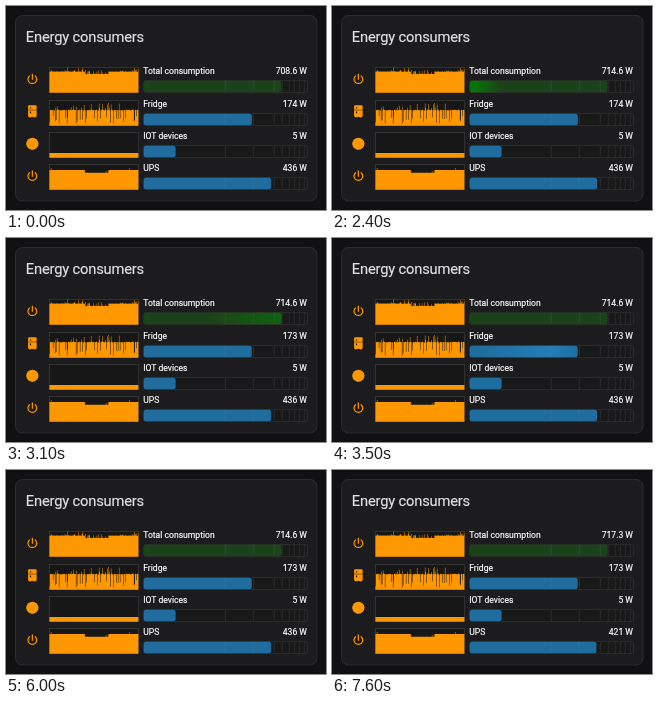
An HTML page for the animation above (9 s loop, 320x204 px).

```html
<!DOCTYPE html>
<html lang="en">
<head>
<meta charset="utf-8">
<title>Energy consumers</title>
<style>
html, body { margin: 0; width: 100%; height: 100%; overflow: hidden; background: #111012; }
svg { display: block; width: 100vw; height: 100vh; }
text { font: 8.6px Roboto, Arial, sans-serif; fill: #fff; stroke: #fff; stroke-width: 0.18px; }
.title { font-size: 14.7px; letter-spacing: -0.012em; fill: #e1e1e1; stroke: #e1e1e1; }
.value { text-anchor: end; }
.orange { fill: #ff9800; }
</style>
</head>
<body>
<svg id="stage" viewBox="0 0 320 204"></svg>
<script>
const LOOP = 9000, LEFT = 137, WIDTH = 165, MAX_WATTS = 2500;
const stage = document.getElementById('stage');

function add(tag, attrs, parent = stage, text = '') {
  const node = document.createElementNS('http://www.w3.org/2000/svg', tag);
  for (const key in attrs) node.setAttribute(key, attrs[key]);
  node.textContent = text;
  parent.appendChild(node);
  return node;
}

function seeded(seed) {
  return () => (seed = (seed * 16807) % 2147483647) / 2147483647;
}

const POWER = 'M16.56 5.44L15.11 6.89C16.84 7.94 18 9.83 18 12A6 6 0 0 1 6 12C6 9.83 7.16 7.94 8.88 6.88L7.44 5.44C5.36 6.88 4 9.28 4 12A8 8 0 0 0 20 12C20 9.28 18.64 6.88 16.56 5.44M13 3H11V13H13';
const FRIDGE = 'M7 2H17A2 2 0 0 1 19 4V9H5V4A2 2 0 0 1 7 2M19 19A2 2 0 0 1 17 21V22H15V21H9V22H7V21A2 2 0 0 1 5 19V10H19V19M8 5V7H10V5H8M8 12V15H10V12H8Z';
const DOT = 'M2 12A10 10 0 0 1 22 12A10 10 0 0 1 2 12Z';

// Column heights, measured up from the chart's floor
const dip = x => x > 35 && x < 59;
const charts = {
  total: (x, rnd) => (dip(x) ? 18.6 : 21) + rnd() * 0.5 + (rnd() < 0.14 ? 1 + rnd() * 3 : 0),
  fridge: (x, rnd) => {
    const pick = rnd();
    if (pick < 0.13) return 2 + rnd() * 8;
    return pick > 0.9 ? 17 + rnd() * 6 : 15.2 + rnd();
  },
  iot: () => 4.8,
  ups: (x, rnd) => (dip(x) ? 17 : 19.8) + (rnd() < 0.02 ? 2 : 0)
};

// steps: [time, watts]; sweeps: [start, end, direction]
const rows = [
  { name: 'Total consumption', icon: POWER, chart: 'total', bar: '#1c4219', glow: '#08750a', digits: 1,
    steps: [[0, 708.6], [2400, 714.6], [7300, 717.3]], sweeps: [[2400, 3300, 1]], strength: 1 },
  { name: 'Fridge', icon: FRIDGE, chart: 'fridge', bar: '#1f6d9f', glow: '#2b8dcb', digits: 0,
    steps: [[0, 174], [3000, 173]], sweeps: [[3400, 3900, -1]], strength: 0.5 },
  { name: 'IOT devices', icon: DOT, chart: 'iot', bar: '#1f6d9f', glow: '#2b8dcb', digits: 0,
    steps: [[0, 4.7]], sweeps: [], strength: 0 },
  { name: 'UPS', icon: POWER, chart: 'ups', bar: '#1f6d9f', glow: '#2b8dcb', digits: 0,
    steps: [[0, 436], [7300, 421]], sweeps: [[100, 700, 1]], strength: 0.3 }
];

const barWidth = watts => WIDTH * Math.log(watts) / Math.log(MAX_WATTS);

function drawChart(row, y, seed) {
  const floor = y + 12.8, rnd = seeded(seed);
  add('rect', { x: 43.5, y: y - 12.5, width: 89, height: 25, fill: '#171717', stroke: '#3c3c3c', 'stroke-width': 0.7 });
  let path = `M43.4 ${floor}`;
  for (let x = 0; x < 89; x += 0.5) {
    path += `V${(floor - charts[row.chart](x, rnd)).toFixed(1)}h.5`;
  }
  add('path', { d: path + `V${floor}Z`, class: 'orange' });
}

function drawRow(row, i) {
  const line = 74.2 + i * 32.3;
  const y = Math.round(line + 0.1);
  add('path', { d: row.icon, class: 'orange',
    transform: `translate(19 ${line - 8.4}) scale(.614)` });
  drawChart(row, y, 4711 + i * 977);
  add('text', { x: LEFT + 0.2, y: line - 6 }, stage, row.name);
  row.label = add('text', { x: 301, y: line - 6, class: 'value' });

  add('rect', { x: LEFT + 0.5, y: y + 0.5, width: WIDTH - 1, height: 12, rx: 2.5,
    fill: '#191919', stroke: '#303030', 'stroke-width': 0.8 });
  const fade = add('linearGradient', { id: 'glow' + i });
  for (const [offset, opacity] of [[0, 0], [0.72, 1], [1, 0]]) {
    add('stop', { offset, 'stop-color': row.glow, 'stop-opacity': opacity }, fade);
  }
  const clip = add('clipPath', { id: 'clip' + i });
  const box = { x: LEFT + 0.7, y: y + 0.7, height: 11.6, rx: 2.5 };
  row.mask = add('rect', box, clip);
  row.fill = add('rect', { ...box, fill: row.bar });
  const group = add('g', { 'clip-path': `url(#clip${i})` });
  row.sweep = add('rect', { y, width: 97, height: 13, fill: `url(#glow${i})` }, group);
  for (const x of [219, 247, 268, 276, 283, 288, 293, 298]) {
    add('path', { d: `M${x + 0.3} ${y + 1}v11`, stroke: '#777', 'stroke-width': 0.7, opacity: 0.25 });
  }
}

function updateRow(row, t) {
  const at = row.steps.filter(step => step[0] <= t).length - 1;
  const [start, watts] = row.steps[at];
  const before = at ? row.steps[at - 1][1] : watts;
  const ease = Math.min(1, (t - start + 100) / 400);
  const width = barWidth(before + (watts - before) * ease);
  row.label.textContent = watts.toFixed(row.digits) + ' W';
  row.fill.setAttribute('width', width - 0.7);
  row.mask.setAttribute('width', width - 0.7);

  const active = row.sweeps.find(s => t >= s[0] && t < s[1]);
  row.sweep.setAttribute('opacity', 0);
  if (!active) return;
  const [from, to, direction] = active;
  const p = (t - from) / (to - from);
  const along = Math.min(1, p / 0.78);
  const head = LEFT + 5 + (width - 5) * (direction > 0 ? along : 1 - along);
  const leave = Math.min(1, (1 - p) / 0.36);
  row.sweep.setAttribute('x', head - 70);
  row.sweep.setAttribute('opacity', row.strength * leave);
}

add('rect', { width: 320, height: 204, fill: '#111012' });
add('rect', { x: 9.5, y: 9.5, width: 301.5, height: 185.5, rx: 7, fill: '#1c1b1d', stroke: '#2d2d2d' });
add('text', { x: 19.8, y: 36.3, class: 'title' }, stage, 'Energy consumers');
rows.forEach(drawRow);

const began = performance.now();
function draw() {
  // The panel refreshes ten times a second
  const t = Math.floor(((performance.now() - began) % LOOP) / 100) * 100;
  rows.forEach(row => updateRow(row, t));
  requestAnimationFrame(draw);
}
draw();
</script>
</body>
</html>
```
